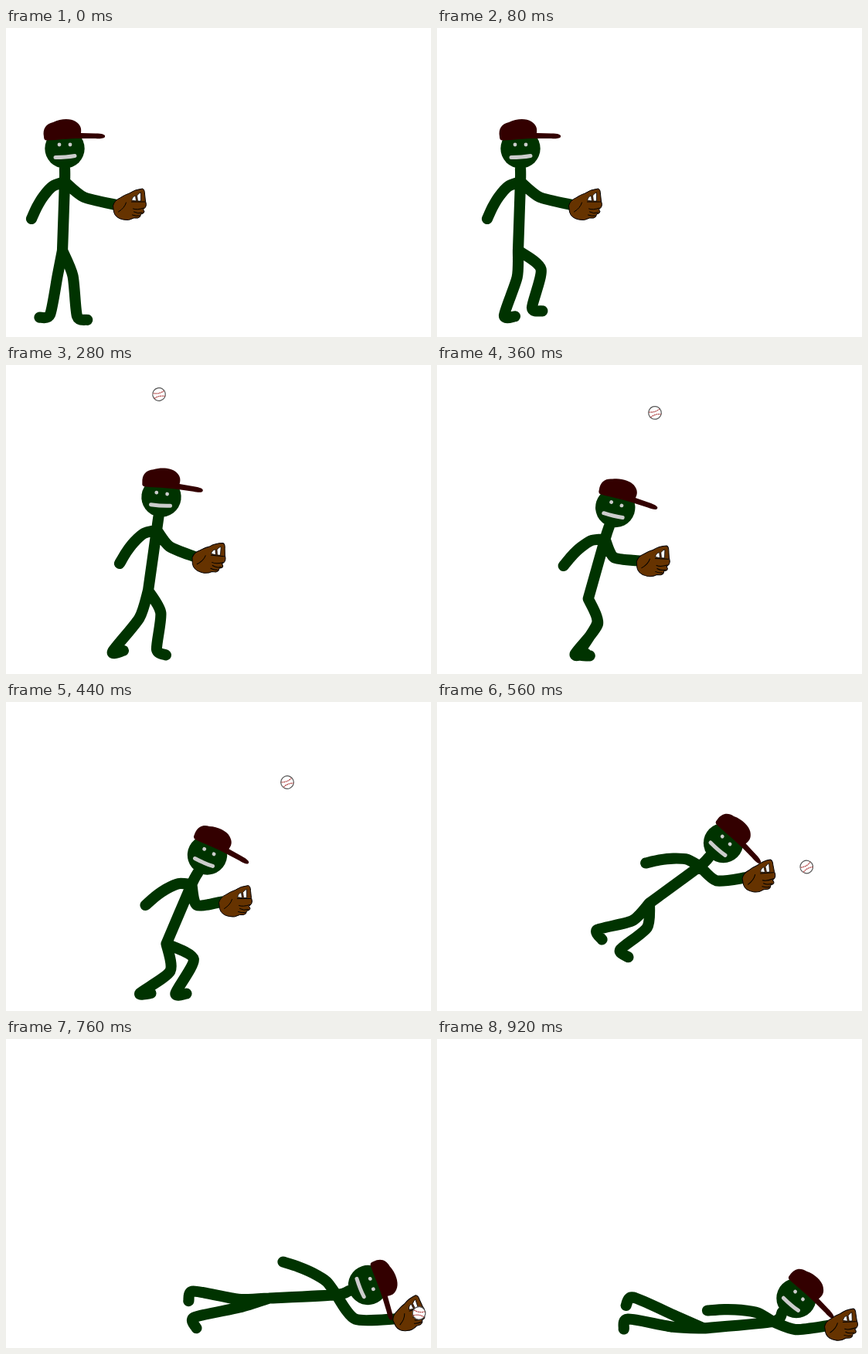
An HTML page for the animation above (0.96 s loop, 550 by 400 pixels).

```html
<!DOCTYPE html>
<html lang="en">
<head>
<meta charset="utf-8">
<title>Diving catch</title>
<style>
  html, body { margin: 0; width: 100%; height: 100%; overflow: hidden; background: #fff; }
  svg { display: block; width: 100vw; height: 100vh; }
  .limb { fill: none; stroke: #030; stroke-width: 14.2; stroke-linecap: round; stroke-linejoin: round; }
  .crease { fill: none; stroke: #000; stroke-width: 1; stroke-linecap: round; }
</style>
</head>
<body>
<svg viewBox="0 0 550 400">
  <rect width="550" height="400" fill="#fff"/>
  <g id="figure">
    <path id="limbs" class="limb"/>
    <g id="head">
      <circle r="25.7" fill="#030"/>
      <g fill="#ccc"><circle cx="-7" cy="-5" r="2.4"/><circle cx="7" cy="-5" r="2.4"/></g>
      <path d="M-12 11.5Q2 11.5 13 9.5" fill="none" stroke="#ccc" stroke-width="5" stroke-linecap="round"/>
      <path fill="#300" d="M-27-15C-29-26-24-32-15-34C-5-39 8-39 14-35C20-31 22-27 21-20L40-19.5C48-19.5 53-18 52-15.5C52-13 46-12.5 40-13L20-13C5-13-10-11-22-10.5Q-27-10-27-15Z"/>
    </g>
    <g id="glove">
      <path fill="#630" stroke="#000" d="M-21 1Q-19-6-12-9Q-6-13 0-15Q7-20 17-21Q20-20 20-14L21-5Q23 0 21 3L18 6Q21 9 18 11L15 12Q15 16 11 17L6 17Q-1 21-8 19Q-18 17-20 9Z"/>
      <path fill="#fff" stroke="#000" stroke-width=".8" d="M3-6Q4-11 8-12L9-5ZM11-5L10-12Q13-16 15-16L15-5Z"/>
      <path class="crease" d="M-14 9Q-6 4-4-3M3-4H20M5 5Q10 7 19 4M6 9Q11 12 17 10M4 13Q9 15 13 14"/>
    </g>
  </g>
  <g id="ball">
    <circle r="8.3" fill="#fff" stroke="#555" stroke-width="1.2"/>
    <path d="M-7-3Q0 0 7-3M-7 4Q0 1 7 4" fill="none" stroke="#b34a4a" stroke-width="1.3" stroke-dasharray="2 .6"/>
  </g>
</svg>
<script>
const STEP = 40, LOOP = 960, LEAP = 440, LAND = 640, HOP = 40;
const RAD = Math.PI / 180;
const el = id => document.getElementById(id);

// head and glove: x, y, angle; legs: ankle x, y, toe angle, knee bend.
// All parts are measured from the head; bow is the front elbow's bend.
const stance = { head: [76, 156, 0], glove: [83.5, 73, 0], hip: [-3, 132], hand: [-43, 91], bow: [8],
  legA: [-19, 215, 165, 0], legB: [16, 217, 20, 6] };
const poses = [
  { t: 0, ...stance },
  { t: 80, ...stance, head: [108, 156, 0],
    legA: [-21, 216, 5, 6], legB: [15, 206, 18, 23] },
  { t: 280, head: [201, 171, 8], glove: [61, 79, 5], hip: [-17, 121], hand: [-54, 86], bow: [8],
    legA: [-6, 197, 32, 12], legB: [-63, 200, -5, 8] },
  { t: LEAP, head: [260.5, 198, 28], glove: [36, 60.5, 0], hip: [-53, 115], hand: [-80, 65], bow: [20],
    legA: [-87, 179, 0, 21], legB: [-41, 179, 2, 31] },
  { t: LAND, head: [444, 235.5, 57], glove: [51.5, 32.5, -7], hip: [-124, 53], hand: [-114, 0], bow: [8],
    legA: [-214, 68, 107, 3], legB: [-195, 111, 70, 3] },
  { t: 760, head: [468.5, 318.5, 73], glove: [52, 38.5, -18], hip: [-128, 17], hand: [-110, -30], bow: [20],
    legA: [-226, 8, 116, 5], legB: [-225, 42, 78, 2] },
  { t: 920, head: [465, 335.5, 45], glove: [57.5, 35, -2], hip: [-120, 39], hand: [-115, 16], bow: [8],
    legA: [-211, -1, 132, 0], legB: [-218, 27, 112, 3] }
];

function poseAt(t) {
  let i = 0;
  while (i < poses.length - 2 && t >= poses[i + 1].t) i++;
  const a = poses[i], b = poses[i + 1], k = (t - a.t) / (b.t - a.t);
  const pose = {};
  for (const part in stance) pose[part] = a[part].map((v, j) => v + (b[part][j] - v) * k);
  return pose;
}

const polar = (r, deg) => [r * Math.cos(deg * RAD), r * Math.sin(deg * RAD)];
const add = (a, b) => [a[0] + b[0], a[1] + b[1]];

// joint between two ends, pushed sideways by bend
function joint(a, b, part, bend) {
  const dx = b[0] - a[0], dy = b[1] - a[1], len = Math.hypot(dx, dy);
  return [a[0] + dx * part + dy / len * bend, a[1] + dy * part - dx / len * bend];
}

// smooth path through the points
function curve(...p) {
  const at = i => p[Math.max(0, Math.min(p.length - 1, i))];
  let d = 'M' + p[0];
  for (let i = 0; i < p.length - 1; i++) {
    const [o, a, b, c] = [at(i - 1), at(i), at(i + 1), at(i + 2)];
    const c1 = a.map((v, k) => v + (b[k] - o[k]) / 8);
    const c2 = b.map((v, k) => v - (c[k] - a[k]) / 8);
    d += `C${c1} ${c2} ${b}`;
  }
  return d;
}

function leg(hip, [x, y, toe, bend]) {
  const ankle = [x, y];
  return curve(hip, joint(hip, ankle, 0.4, bend), ankle, add(ankle, polar(14, toe)));
}

function backArm(shoulder, hand) {
  const elbow = joint(shoulder, hand, 0.5, -8);
  return curve(shoulder, joint(shoulder, elbow, 0.5, -4), elbow, joint(elbow, hand, 0.5, -1), hand);
}

function place(id, x, y, angle = 0) {
  el(id).setAttribute('transform', `translate(${x} ${y}) rotate(${angle})`);
}

function drawFigure(t) {
  const { head, glove, hip, hand, bow, legA, legB } = poseAt(t);
  const [x, y, tilt] = head;
  const air = Math.max(0, Math.min(1, (t - LEAP) / (LAND - LEAP)));
  const neck = polar(26, tilt + 90), shoulder = polar(43, tilt + 90);
  const wrist = add(glove, polar(-17, glove[2]));

  place('figure', x, y - HOP * Math.sin(Math.PI * air));
  place('head', 0, 0, tilt);
  place('glove', ...glove);
  el('limbs').setAttribute('d', [
    curve(neck, shoulder, hip),
    backArm(shoulder, hand),
    curve(shoulder, joint(shoulder, wrist, 0.42, -bow[0]), wrist),
    leg(hip, legA),
    leg(hip, legB)
  ].join(''));
}

// n counts steps from the moment the ball is overhead
function drawBall(t) {
  const n = (t - 280) / STEP, drop = n - 9;
  el('ball').setAttribute('visibility', n >= -4 && n < 15 ? 'visible' : 'hidden');
  if (drop > 0) {
    place('ball', 515 + 6.5 * drop, 325.5 + 9.8 * drop, 14 * drop - 34);
  } else {
    const slow = Math.max(0, n - 6);
    place('ball',
      198 + 42.5 * n - 0.25 * n ** 2 - 5 * slow ** 2,
      38 + 8.3 * n + 1.59 * n ** 2 + 0.115 * n ** 3,
      -12 - 2.5 * n);
  }
}

const start = performance.now();
function tick() {
  const t = Math.floor((performance.now() - start) % LOOP / STEP) * STEP;
  drawFigure(t);
  drawBall(t);
  requestAnimationFrame(tick);
}
tick();
</script>
</body>
</html>
```
